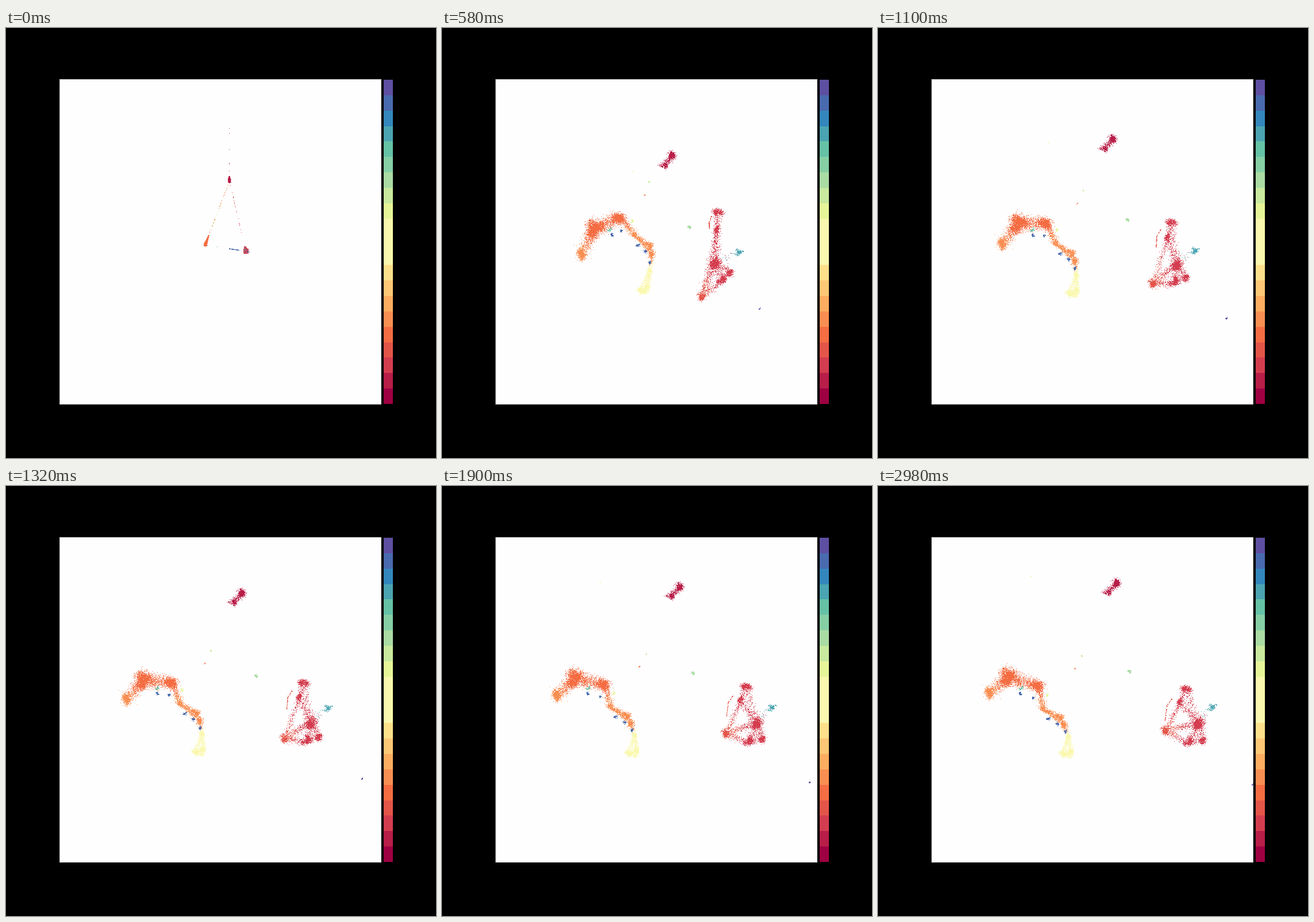
Write a matplotlib script that moves like this. It is 748 px wide and 748 px high and loops after 3.03 s.

```python
import numpy as np
import matplotlib as mpl
import matplotlib.pyplot as plt
from matplotlib.animation import FuncAnimation
from matplotlib.patches import Rectangle

SIZE, DPI = 748, 100
STEP, LAST = 20, 2980
BURST, SETTLE = 580, 700

rng = np.random.default_rng(7)
colors = [mpl.colormaps["Spectral"](k / 20) for k in range(21)]
colors[9:12] = ["#faf8ae"] * 3

# every cluster: x, y after the burst, x, y at rest, radius, color
left = [
    (242, 395, 193, 361, 9, 5), (263, 352, 224, 335, 14, 4),
    (309, 330, 279, 347, 10, 4), (334, 360, 286, 388, 4, 5),
    (361, 379, 317, 403, 5, 5), (365, 394, 324, 416, 5, 5),
]
tail = [(361, 424, 331, 438, 4, 10), (357, 455, 336, 466, 6, 10),
        (344, 458, 320, 467, 6, 10)]
right = [
    (479, 318, 535, 351, 7, 2), (478, 352, 525, 377, 5, 2),
    (474, 408, 557, 412, 10, 2), (500, 425, 564, 442, 6, 2),
    (487, 440, 541, 447, 7, 2), (451, 469, 499, 427, 6, 3),
]
arc = [(469, 328, 511, 371, 0.8, 3), (464, 340, 502, 383, 0.8, 3),
       (465, 349, 499, 408, 0.8, 3)]
crown = [(402, 221, 417, 168, 7, 1), (387, 239, 400, 185, 5.5, 1)]
teal = [(515, 390, 580, 385, 4, 17), (523, 389, 588, 381, 1, 17)]
isles = {
    "far": [(552, 489, 651, 520, 1.6, 20)],
    "speck": [(429, 347, 436, 323, 3, 14)],
    "left": [(352, 291, 342, 318, 1.2, 4)],
    "yellow": [(332, 250, 267, 158, 0.7, 8), (360, 268, 354, 296, 1.2, 13)],
}

# all points start on the edges of a triangle: from, to, span, width
A, B, C = np.array([(388, 267), (346, 378), (417, 389)])
spawn = {
    "left": (B, A, 0, 0.15, 2), "yellow": (B, A, 0.3, 0.7, 0),
    "speck": (B, C, 0.6, 0.85, 0), "right": (C, A, 0, 0.07, 3.5),
    "far": (B, C, 1.03, 1.08, 0), "crown": (A, A - (0, 100), 0, 0.09, 2.4),
}


def start(kind, n):
    a, b, lo, hi, width = spawn[kind]
    spots = 60 if width else 9
    u = np.floor(rng.random((n, 1)) ** 1.5 * spots) / spots
    along = lo + (hi - lo) * u
    stray = rng.random((n, 1)) < 0.005
    along = np.where(stray, rng.random((n, 1)), along)
    spread = np.where(stray, 0.3, 0.3 + width * (1 - u))
    return a + (b - a) * along + rng.uniform(-1, 1, (n, 2)) * spread


parts = {}


def add(kind, color, early, rest):
    cloud = np.stack([start(kind, len(rest)), early, rest])
    parts.setdefault(color, []).append(cloud)


def clump(kind, node):
    """A ragged blob made of a few overlapping lumps."""
    early, rest, r, color = node[:2], node[2:4], node[4], node[5]
    n = int(7 * r * r)
    lumps = rng.normal(0, 0.45 * r, (6, 2))
    off = lumps[rng.integers(0, 6, n)] + rng.normal(0, 0.35 * r, (n, 2))
    add(kind, color, early + off, rest + off)


def strand(kind, a, b, density):
    """Loose points between two clusters."""
    width = 0.45 * (a[4] + b[4]) / 2
    length = np.hypot(*np.subtract(a[2:4], b[2:4]))
    n = int(length * (1 + density * width))
    u = rng.random((n, 1))
    off = rng.normal(0, width, (n, 2))
    ends = np.array([a[:4], b[:4]], float)
    mid = ends[0] * (1 - u) + ends[1] * u
    near_a = (u[:, 0] + rng.normal(0, 0.1, n)) < 0.5
    for mask, color in ((near_a, a[5]), (~near_a, b[5])):
        add(kind, color, (mid[:, :2] + off)[mask], (mid[:, 2:] + off)[mask])


def web(kind, nodes, reach=62, density=1.0):
    for i, a in enumerate(nodes):
        clump(kind, a)
        for b in nodes[:i]:
            if np.hypot(a[2] - b[2], a[3] - b[3]) < reach:
                strand(kind, a, b, density)


def beside(a, b, shift, radius, color):
    """A cluster next to the middle of a strand."""
    ends = np.array([a[:4], b[:4]], float).reshape(2, 2, 2)
    d = ends[1] - ends[0]
    normal = np.stack([-d[:, 1], d[:, 0]], 1) / np.hypot(*d.T)[:, None]
    return (*(ends.mean(0) + shift * normal).ravel(), radius, color)


web("left", left, density=2.4)
web("yellow", tail, density=2.4)
strand("yellow", left[-1], tail[0], 2)
web("right", right)
strand("right", right[2], right[0], 0.3)
web("right", arc, reach=30)
web("crown", crown, density=2.4)
web("far", teal)
strand("right", teal[0], right[2], 0)
for kind, nodes in isles.items():
    web(kind, nodes, reach=0)

spine = left + tail
for k, color, shift in ((1, 16, 12), (1, 19, 21), (2, 12, -11), (2, 19, 14),
                        (3, 19, 10), (4, 19, 11), (5, 19, 3)):
    clump("speck", beside(spine[k], spine[k + 1], shift, 2.6, color))

fig = plt.figure(figsize=(SIZE / DPI, SIZE / DPI), dpi=DPI, facecolor="black")
ax = fig.add_axes((0, 0, 1, 1))
ax.set(xlim=(0, SIZE), ylim=(SIZE, 0))
ax.axis("off")


def box(x0, y0, x1, y1, color):
    return ax.add_patch(Rectangle((x0, y0), x1 - x0, y1 - y0,
                                  fc=color, lw=0, aa=False))


box(93, 89, 653, 655, "#cccccc")
panel = box(94, 90, 652, 654, "#fefefe")
edges = np.linspace(654, 90, 22).round()
for bottom, top, color in zip(edges, edges[1:], colors):
    box(657, top, 673, bottom, color)

clouds = []
order = sorted(parts, key=lambda c: (c > 10, -c if c <= 10 else c))
for z, c in enumerate(order):
    line, = ax.plot([], [], ",", color=colors[c], zorder=3 + z)
    line.set_clip_path(panel)
    clouds.append((line, np.concatenate(parts[c], axis=1)))


def draw(i):
    t = min(i // 2 * STEP, LAST)
    burst = min(t / BURST, 1) ** 0.6
    settle = (np.expm1(-max(t - BURST, 0) / SETTLE)
              / np.expm1(-(LAST - BURST) / SETTLE))
    for line, (first, early, rest) in clouds:
        pos = first + (early - first) * burst + (rest - early) * settle
        line.set_data(pos[:, 0], pos[:, 1])
    return [line for line, _ in clouds]


anim = FuncAnimation(fig, draw, frames=303, interval=10, repeat=True,
                     repeat_delay=0, blit=False)
plt.show()
```
